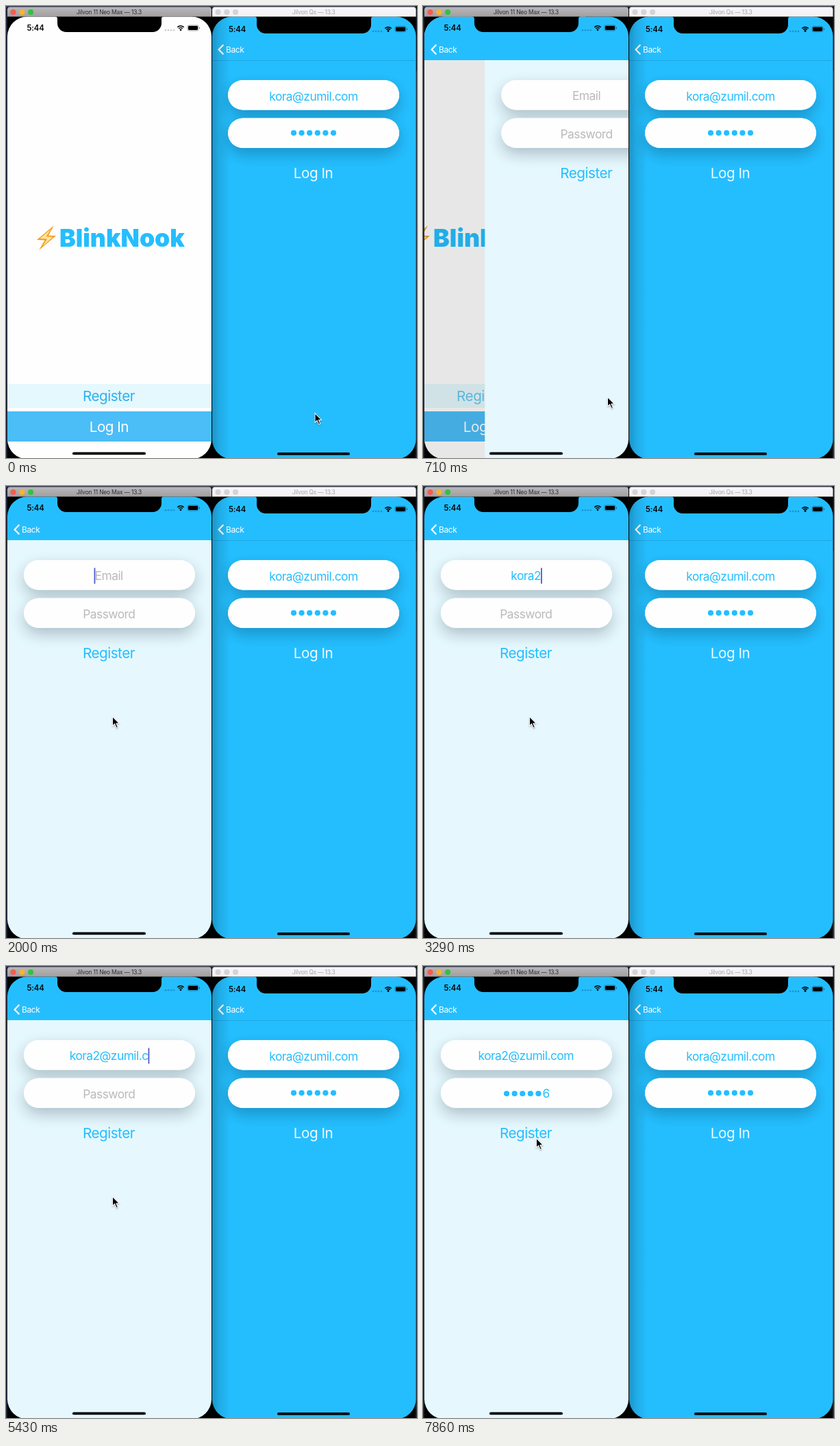
Recreate the animation shown at these times as an HTML page with a canvas. Size 600 px wide and 659 px high, loop 8 s.

```html
<!DOCTYPE html>
<html lang="en">
<head>
<meta charset="utf-8">
<title>Two phone simulators</title>
<style>
html, body { margin: 0; width: 100%; height: 100%; overflow: hidden; background: #000; }
canvas { display: block; }
</style>
</head>
<body>
<canvas id="stage" width="600" height="659"></canvas>
<script>
const ctx = document.getElementById('stage').getContext('2d');
const LOOP = 8000;
const BLUE = '#24beff', PALE = '#e6f8fe', HINT = '#b9babd';
const MAIL = 'kora2@zumil.com', PASS = '123456';

// Beats (1/7 s) at which each character is typed
const mailKeys = [16, 17, 18, 19, 21, 29, 31, 32, 33, 34, 35, 37, 38, 39, 40];
const passKeys = [43, 44, 46, 48, 49, 50];
const MAIL_FOCUS = 12, PASS_FOCUS = 41, PUSH = 4;

// Pointer path: beat, x, y
const pointer = [
  [0, 450.5, 593.5], [1, 402, 588], [2, 330, 580], [3, 274, 571], [5, 269, 570],
  [6, 260, 530], [8, 212, 320], [10, 168, 150], [11, 163, 136], [12, 163, 136],
  [13, 158, 260], [14, 155, 336], [51, 155, 336], [54, 162, 264], [55, 165, 251]
];

const clamp = (v, a, b) => Math.min(b, Math.max(a, v));
const typedBy = (keys, beat) => keys.filter(k => k <= beat).length;

function rect(x, y, w, h, fill) {
  ctx.fillStyle = fill;
  ctx.fillRect(x, y, w, h);
}

function round(x, y, w, h, r, fill) {
  ctx.beginPath();
  ctx.roundRect(x, y, w, h, r);
  ctx.fillStyle = fill;
  ctx.fill();
}

function dot(x, y, r, fill) {
  ctx.beginPath();
  ctx.arc(x, y, r, 0, Math.PI * 2);
  ctx.fillStyle = fill;
  ctx.fill();
}

function poly(points, fill) {
  ctx.beginPath();
  points.forEach(([x, y]) => ctx.lineTo(x, y));
  ctx.closePath();
  ctx.fillStyle = fill;
  ctx.fill();
}

function setFont(size, weight = 400, track = -0.031) {
  ctx.font = `${weight} ${size}px Inter, "Open Sans", sans-serif`;
  ctx.letterSpacing = `${(track * size).toFixed(2)}px`;
}

function text(str, x, y, size, fill, { weight, track, align = 'center' } = {}) {
  setFont(size, weight, track);
  ctx.textAlign = align;
  ctx.fillStyle = fill;
  ctx.fillText(str, x, y);
}

function fieldText(str, x, y, fill) {
  text(str, x, y, 17.4, fill);
}

function buttonText(str, x, y, fill) {
  text(str, x, y, 20.7, fill, { track: -0.025 });
}

function desktop() {
  rect(0, 0, 600, 659, '#000');
  rect(0, 0, 600, 2, '#353b50');
  rect(0, 2, 2, 657, '#20263a');
  rect(598, 0, 2, 95, '#15171f');
  rect(598, 95, 2, 564, '#2b2d35');
}

function titleBar(x, w, title, top, bottom, ink, lights) {
  const g = ctx.createLinearGradient(0, 1, 0, 15);
  g.addColorStop(0, top);
  g.addColorStop(1, bottom);
  round(x, 1.5, w, 14, [4, 4, 0, 0], g);
  lights.forEach((c, i) => dot(x + 8.5 + i * 12.8, 9, 4.1, c));
  text(title, x + w / 2 - 0.5, 12, 8.4, ink, { track: -0.02 });
}

function notch(x1, x2, bottom) {
  const r = 13, c = 4;
  ctx.beginPath();
  ctx.moveTo(x1 - c, 15);
  ctx.quadraticCurveTo(x1, 15, x1, 15 + c);
  ctx.arcTo(x1, bottom, x1 + r, bottom, r);
  ctx.arcTo(x2, bottom, x2, bottom - r, r);
  ctx.lineTo(x2, 15 + c);
  ctx.quadraticCurveTo(x2, 15, x2 + c, 15);
  ctx.fillStyle = '#000';
  ctx.fill();
}

function statusBar(clockX, baseline, wifiX, y, dots) {
  text('5:44', clockX, baseline, 11.3, '#000', { weight: 600, track: -0.01 });
  for (let i = 0; i < 4; i++) dot(wifiX - 22 + i * 4, y + 3.2, 1.3, dots);
  ctx.strokeStyle = '#000';
  ctx.lineWidth = 1.6;
  for (const r of [3.8, 6.5]) {
    ctx.beginPath();
    ctx.arc(wifiX, y + 3.5, r, -Math.PI * 0.76, -Math.PI * 0.24);
    ctx.stroke();
  }
  dot(wifiX, y + 2.8, 1.4, '#000');
  ctx.lineWidth = 0.8;
  ctx.strokeStyle = 'rgba(0,0,0,.45)';
  ctx.beginPath();
  ctx.roundRect(wifiX + 10, y - 4, 16, 8, 2.4);
  ctx.stroke();
  round(wifiX + 11, y - 3, 14, 6, 1.4, '#000');
  rect(wifiX + 27, y - 1.2, 1, 2.4, 'rgba(0,0,0,.45)');
}

function backButton(x) {
  ctx.strokeStyle = '#fff';
  ctx.lineWidth = 2.2;
  ctx.beginPath();
  ctx.moveTo(x + 8.4, 56.5);
  ctx.lineTo(x + 1.6, 63.5);
  ctx.lineTo(x + 8.4, 70.5);
  ctx.stroke();
  text('Back', x + 12, 67.8, 12, '#fff', { align: 'left', track: -0.03 });
}

function pills(x, shade) {
  for (const pass of [0, 1]) {
    for (const y of [108, 163.5]) {
      ctx.save();
      if (!pass) {
        ctx.shadowColor = shade;
        ctx.shadowBlur = 22;
        ctx.shadowOffsetY = 9;
      }
      round(x, y, 250, 43.5, 21.75, '#fefefe');
      ctx.restore();
    }
  }
}

// The screen's lower edge lies just below the stage
function inScreen(x, w, paint) {
  ctx.save();
  ctx.beginPath();
  ctx.roundRect(x, 15.5, w, 645, 29);
  ctx.clip();
  paint();
  ctx.restore();
}

// A secure field: bullets, optionally ending in the last typed character
function secret(n, shown, cx, y) {
  const pitch = 11.6, bullets = shown ? n - 1 : n;
  const width = bullets * pitch + (shown ? 10.5 : 0);
  const left = cx - width / 2;
  for (let i = 0; i < bullets; i++) dot(left + (i + 0.5) * pitch, y, 4.1, BLUE);
  if (shown) text(shown, left + width - 5.2, y + 6.2, 17.4, BLUE);
  return left + width;
}

function caret(x, y, beat, since) {
  if ((beat - since) % 7 < 4) rect(x, y, 1.7, 23, '#4451c9');
}

function bolt() {
  poly([[70, 320], [45, 341], [56.5, 341.5], [48, 356], [73, 335], [62, 334.5]], '#f0a024');
  poly([[65.5, 325.5], [49.5, 339], [60, 339.5], [53.5, 350], [68.5, 336.8], [58.5, 336.3]], '#ffe3a0');
}

function welcome(beat) {
  rect(2, 15, 298, 644, '#fefefe');
  bolt();
  text('BlinkNook', 78, 351, 35.6, BLUE, { weight: 900, track: 0, align: 'left' });
  rect(2, 551, 298, 35, '#e5f8fd');
  rect(2, 591, 298, 44, '#4bbdf7');
  ctx.globalAlpha = beat < 3 ? 1 : beat < 5 ? 0.3 : 0.7;
  buttonText('Register', 150, 576.3, '#2db2ec');
  ctx.globalAlpha = 1;
  buttonText('Log In', 150.4, 621.3, '#fff');
}

function editMenu(alpha) {
  ctx.globalAlpha = alpha;
  ctx.beginPath();
  ctx.roundRect(147.5, 81, 50, 25.5, 5);
  ctx.moveTo(166.5, 106.5);
  ctx.lineTo(172.5, 112.5);
  ctx.lineTo(178.5, 106.5);
  ctx.fillStyle = '#2b2b2d';
  ctx.fill();
  text('Paste', 172.5, 97.5, 10, '#fff', { track: -0.02 });
  ctx.globalAlpha = 1;
}

function mailField(beat) {
  const n = typedBy(mailKeys, beat), str = MAIL.slice(0, n);
  fieldText(n ? str : 'Email', 150.2, 137.2, n ? BLUE : HINT);
  if (beat < MAIL_FOCUS || beat >= PASS_FOCUS) return;
  const half = ctx.measureText(n ? str : 'Email').width / 2;
  caret(n ? 150.2 + half : 149.2 - half, 119.5, beat, n ? mailKeys[n - 1] : MAIL_FOCUS);
}

function passField(beat) {
  const n = typedBy(passKeys, beat);
  if (!n) {
    fieldText('Password', 150.3, 192.6, HINT);
    if (beat >= PASS_FOCUS) caret(112, 174.5, beat, PASS_FOCUS);
    return;
  }
  const end = secret(n, PASS[n - 1], 150.5, 186);
  caret(end, 174.5, beat, passKeys[n - 1]);
}

function registerPage(beat) {
  rect(2, 79, 298, 580, PALE);
  pills(26, 'rgba(0,20,30,.25)');
  mailField(beat);
  passField(beat);
  buttonText('Register', 150, 251.3, BLUE);
}

function leftPhone(beat) {
  const u = clamp((beat - PUSH) / 3, 0, 1);
  const p = 1 - (1 - u) ** 3;
  const pushed = beat >= PUSH;
  inScreen(2, 298, () => {
    if (p < 1) {
      ctx.save();
      ctx.translate(-0.3 * 298 * p, 0);
      welcome(beat);
      ctx.restore();
      rect(2, 15, 298, 644, `rgba(0,0,0,${0.13 * p})`);
    }
    if (pushed) {
      ctx.save();
      ctx.translate(298 * (1 - p), 0);
      registerPage(beat);
      ctx.restore();
      rect(2, 15, 298, 64, BLUE);
      backButton(11);
    }
    if (beat >= 24 && beat <= 29) editMenu(beat === 24 ? 0.5 : beat === 29 ? 0.2 : 0.95);
    statusBar(43, 36.2, 255, 32, pushed ? '#1b93c9' : '#c9cccf');
  });
  notch(75, 227, 38);
  round(97, 650.5, 107, 3.8, 2, '#000');
}

function rightPhone() {
  inScreen(301, 297.5, () => {
    rect(301, 15, 298, 644, BLUE);
    rect(301, 79, 298, 1, '#1ea6e0');
    backButton(309);
    pills(324, 'rgba(0,25,45,.27)');
    fieldText(MAIL.replace('2', ''), 449, 138.2, BLUE);
    secret(6, '', 449, 185);
    buttonText('Log In', 448.5, 250.8, '#f2fbff');
    statusBar(337.5, 37.8, 558, 33.7, '#1b93c9');
    // Shadow cast by the front window
    const g = ctx.createLinearGradient(300, 0, 328, 0);
    g.addColorStop(0, 'rgba(0,0,0,.24)');
    g.addColorStop(0.4, 'rgba(0,0,0,.1)');
    g.addColorStop(1, 'rgba(0,0,0,0)');
    rect(300, 15, 28, 644, g);
  });
  notch(366, 533, 40);
  round(396, 651, 106, 3.8, 2, '#000');
}

function arrow(beat) {
  let i = pointer.findIndex(q => q[0] > beat);
  if (i < 0) i = pointer.length - 1;
  const [b0, x0, y0] = pointer[i - 1], [b1, x1, y1] = pointer[i];
  const f = (beat - b0) / (b1 - b0);
  ctx.save();
  ctx.translate(x0 + (x1 - x0) * f, y0 + (y1 - y0) * f);
  ctx.shadowColor = 'rgba(0,0,0,.35)';
  ctx.shadowBlur = 2;
  ctx.shadowOffsetY = 1;
  poly([[0, -1], [0, 15], [3.6, 11.8], [6, 17.3], [9, 16], [6.7, 10.8], [11.3, 10.5]], '#fff');
  ctx.shadowColor = 'transparent';
  poly([[1, 1.5], [1, 12.6], [3.8, 10], [6.5, 15.9], [7.7, 15.4], [5.2, 9.7], [9, 9.5]], '#000');
  ctx.restore();
}

function draw(beat) {
  desktop();
  rightPhone();
  titleBar(301, 297.5, 'Jilvon Qs — 13.3', '#f8f6f7', '#f2f0f1', '#a6a5a6',
    ['#d5d3d4', '#d5d3d4', '#d5d3d4']);
  leftPhone(beat);
  titleBar(2, 298, 'Jilvon 11 Neo Max — 13.3', '#bab8b9', '#a2a0a1', '#2c2b2c',
    ['#f65c54', '#f5b52e', '#32c146']);
  arrow(beat);
}

function tick() {
  const t = performance.now() % LOOP;
  draw(Math.floor((t + 5) * 0.007) % 56);
  requestAnimationFrame(tick);
}
tick();
</script>
</body>
</html>
```
